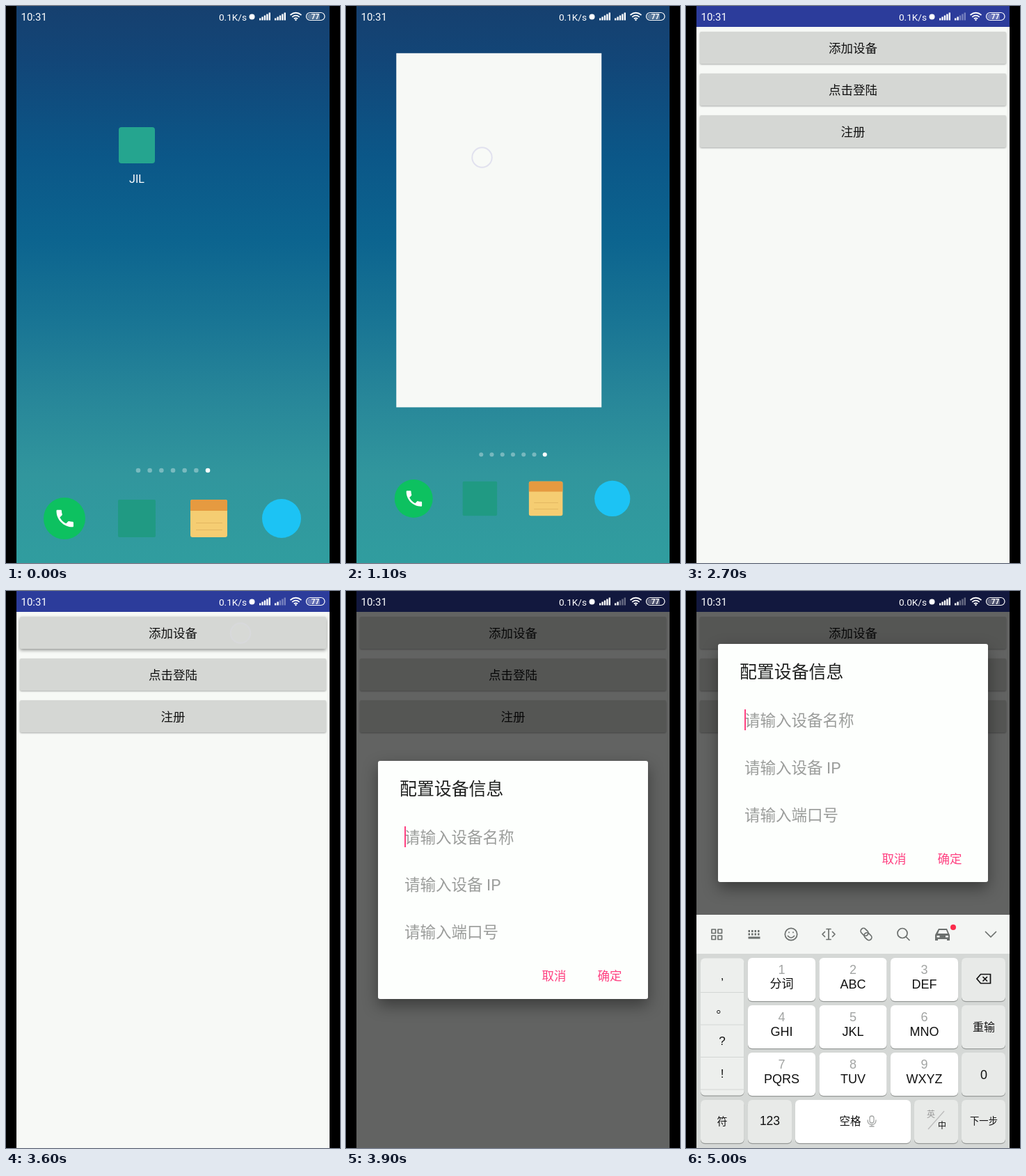
These frames come from a looping animation (480x800 px, 5100 ms). An HTML page:

```html
<!DOCTYPE html>
<html lang="zh-CN">
<head>
<meta charset="utf-8">
<title>Phone walkthrough</title>
<style>
  html, body { margin: 0; width: 100%; height: 100%; overflow: hidden; background: #000; }
  svg { display: block; width: 480px; height: 800px; }
  text { font-family: Roboto, "Noto Sans CJK SC", "Noto Sans CJK", sans-serif; text-anchor: middle; }
  .raised { filter: drop-shadow(0 1px 1px rgba(0,0,0,.32)); }
  .pressed { filter: drop-shadow(0 2.5px 2.5px rgba(0,0,0,.42)); }
  #dialog { filter: drop-shadow(0 9px 11px rgba(0,0,0,.4)); }
  #dialog text { text-anchor: start; }
  #keyboard text { font-family: "Liberation Sans", "Noto Sans CJK SC", "Noto Sans CJK", sans-serif; }
  .line { fill: none; stroke: #6b6f6d; stroke-width: 1.7; stroke-linecap: round; stroke-linejoin: round; }
</style>
</head>
<body>
<svg viewBox="0 0 480 800">
  <defs>
    <linearGradient id="sky" x2="0" y2="1">
      <stop stop-color="#16406f"/>
      <stop offset=".1" stop-color="#124678"/>
      <stop offset=".27" stop-color="#0b5788"/>
      <stop offset=".42" stop-color="#0c648f"/>
      <stop offset=".56" stop-color="#187494"/>
      <stop offset=".7" stop-color="#278699"/>
      <stop offset=".84" stop-color="#31969d"/>
      <stop offset="1" stop-color="#309d9f"/>
    </linearGradient>
    <clipPath id="screen"><rect x="15" width="450" height="800"/></clipPath>
  </defs>
  <rect width="480" height="800"/>
  <g clip-path="url(#screen)">
    <rect x="15" width="450" height="800" fill="url(#sky)"/>

    <g id="home">
      <rect x="162" y="174" width="52" height="52" rx="4" fill="#25a58f"/>
      <text x="188" y="254" font-size="16" fill="#fff">JIL</text>
      <g id="dots" fill="#fff"></g>
      <circle cx="84" cy="736" r="30" fill="#0dc160"/>
      <path transform="translate(68.4 719.7) scale(1.36)" fill="#fff" d="M6.6 10.8c1.4 2.8 3.8 5.1 6.6 6.6l2.2-2.2c.3-.3.7-.4 1-.2 1.1.4 2.3.5 3.6.5.6 0 1 .5 1 1V20c0 .6-.4 1-1 1C10.600 21 3 13.400 3 4c0-.6.5-1 1-1h3.500c.6 0 1 .4 1 1 0 1.300.2 2.500.6 3.600.1.300 0 .7-.3 1z"/>
      <rect x="161" y="709" width="54" height="54" rx="2" fill="#209a83"/>
      <rect x="265" y="709" width="53" height="54" rx="3" fill="#f5cd72"/>
      <path d="M265 725v-13q0-3 3-3h47q3 0 3 3v13z" fill="#e69a40"/>
      <path d="M273 742.500h38M273 752.500h38" stroke="#e3b661"/>
      <circle cx="396" cy="736" r="28" fill="#1cc3f4"/>
    </g>

    <rect id="window" fill="#f7f9f6"/>
    <g id="app">
      <rect x="15" width="450" height="30" fill="#2c3c9b"/>
      <g id="buttons"></g>
    </g>
    <rect id="dim" x="15" width="450" height="800"/>

    <g id="dialog">
      <rect x="46" y="244" width="388" height="342" rx="3" fill="#fdfffd"/>
      <text x="77" y="293" font-size="24.900" fill="#1f201f">配置设备信息</text>
      <g font-size="22.500" fill="#9b9d9b">
        <text x="84" y="362">请输入设备名称</text>
        <text x="84" y="430">请输入设备 IP</text>
        <text x="84" y="498">请输入端口号</text>
      </g>
      <g font-size="17.500" fill="#ff4081">
        <text x="281.500" y="558.500">取消</text>
        <text x="361.500" y="558.500">确定</text>
        <rect id="caret" x="84" y="338" width="2" height="30"/>
      </g>
    </g>

    <g id="keyboard">
      <rect x="15" y="465" width="450" height="56" fill="#f3f5f3"/>
      <rect x="15" y="521" width="450" height="280" fill="#d5d8d6"/>
      <g class="line">
        <path d="M37 486h5.500v5.500H37zM46 486h5.500v5.500H46zM37 495h5.500v5.500H37zM46 495h5.500v5.500H46z"/>
        <path d="M89.500 488.500h17M89.500 493h17" stroke-width="3" stroke-dasharray="2.500 2" stroke-linecap="butt"/>
        <path d="M89.500 498h17" stroke-width="3" stroke-linecap="butt"/>
        <circle cx="151" cy="493" r="8.700"/>
        <path d="M148 490v.5M154 490v.5M146.500 495.500q4.500 5 9 0"/>
        <path d="M202 485.500h6M205 485.500v15M202 500.500h6M199.500 489.500l-3.500 3.500 3.500 3.500M210.500 489.500l3.500 3.500-3.500 3.500"/>
        <g transform="rotate(45 259 493)">
          <rect x="249" y="488.500" width="12" height="8" rx="4"/>
          <rect x="257" y="489.500" width="12" height="8" rx="4"/>
        </g>
        <circle cx="311" cy="491.500" r="7"/>
        <path d="M316 496.500l5 5M430.500 489.500l7.500 7.500 7.500-7.500"/>
      </g>
      <path fill="#6b6f6d" fill-rule="evenodd" d="M363 485h12l3 7 1 2v8h-4v-2h-13v2h-4v-8l1-2zM364 487l-2 5h14l-2-5zM360.500 495v2.500h4V495zM373 495v2.500h4V495z"/>
      <circle cx="384" cy="483" r="4" fill="#fb2b4b"/>
      <g id="keys"></g>
      <path d="M423.500 550.500h14v13h-14l-5.500-6.500zM426.500 554l6.500 6.500m0-6.500l-6.500 6.500" fill="none" stroke="#111" stroke-width="1.700"/>
      <g fill="none" stroke="#a5a7a6" stroke-width="1.300">
        <rect x="264" y="754" width="6" height="10" rx="3"/>
        <path d="M261 759.500q0 7 6 7t6-7M267 766.500v2.500M263.500 769h7"/>
        <path d="M348 773l23-26" stroke="#bbb"/>
      </g>
    </g>

    <g id="status" fill="#fff">
      <text x="21.500" y="21" font-size="15" style="text-anchor:start">10:31</text>
      <text id="speed" x="346" y="20.500" font-size="13.600" style="text-anchor:end"></text>
      <circle cx="353.500" cy="15.500" r="4"/>
      <g id="signals"></g>
      <g fill="none" stroke="#fff" stroke-width="1.700">
        <path d="M408.500 13q8-6.500 16 0M411.200 15.800q5.300-4.200 10.600 0M413.800 18.300q2.700-2 5.400 0"/>
        <rect x="431.500" y="9.500" width="26.500" height="11" rx="5.500" stroke-width="1.200"/>
      </g>
      <path d="M437 11h14v8h-14q-4 0-4-4t4-4z" opacity=".3"/>
      <circle cx="416.500" cy="20" r="1.200"/>
      <text x="444.500" y="18.800" font-size="10" font-weight="700">77</text>
    </g>
    <circle id="touch" r="14.200" fill="#fff" fill-opacity=".15" stroke="#dfdfee" stroke-width="2"/>
  </g>
</svg>
<script>
const $ = id => document.getElementById(id);
const set = (id, attrs) => { for (const k in attrs) $(id).setAttribute(k, attrs[k]); };
const show = (id, on) => { $(id).style.visibility = on ? 'visible' : 'hidden'; };
const label = (x, y, size, str, fill = '#111') =>
  `<text x="${x}" y="${y + size * .37}" font-size="${size}" fill="${fill}">${str}</text>`;
const times = (n, fn) => Array.from({ length: n }, (_, i) => fn(i)).join('');

$('dots').innerHTML = times(7, i =>
  `<circle cx="${190 + i * 16.67}" cy="667" r="3.300" opacity="${i < 6 ? .35 : 1}"/>`);

$('buttons').innerHTML = ['添加设备', '点击登陆', '注册'].map((s, i) =>
  `<g class="raised"><rect x="20" y="${37 + i * 60}" width="440" height="46" rx="2" fill="#d5d7d4"/></g>`
  + label(240, 60.5 + i * 60, 17.5, s)).join('');

$('signals').innerHTML = times(10, i => {
  const bar = i % 5, h = 3 + bar * 2;
  return `<rect x="${364 + (i > 4 ? 22 : 0) + bar * 3.4}" y="${20.5 - h}" width="2.400" height="${h}"/>`;
});
const weakBars = [...$('signals').children].slice(7);

const key = (x, y, w, fill = '#e8eae8', h = 62) =>
  `<rect x="${x}" y="${y + 1.2}" width="${w}" height="${h}" rx="6" fill="#989b99"/>
   <rect x="${x}" y="${y}" width="${w}" height="${h}" rx="6" fill="${fill}"/>`;
const letters = ['分词', 'ABC', 'DEF', 'GHI', 'JKL', 'MNO', 'PQRS', 'TUV', 'WXYZ'];
$('keys').innerHTML =
  key(21, 527.5, 62.5, '#edefed', 197)
  + times(4, i => `<path d="M21 ${576.5 + i * 46.5}h62.500" stroke="#d3d6d4"/>`)
  + [[',', 552], ['。', 600], ['?', 646], ['!', 693]].map(([s, y]) => label(52, y, 17, s)).join('')
  + letters.map((s, i) => {
      const x = 89 + i % 3 * 102.5, y = 527 + Math.floor(i / 3) * 68;
      return key(x, y, 97, '#fff') + label(x + 48.5, y + 16, 18, i + 1, '#a2a4a3')
        + label(x + 48.5, y + 37, i ? 18 : 17, s);
    }).join('')
  + times(3, i => key(396, 527 + i * 68, 63))
  + label(428, 626, 16, '重输') + label(428, 694, 18, '0')
  + key(21, 731, 62.5) + label(52, 761, 15, '符')
  + key(89, 731, 63) + label(120.5, 761, 17.5, '123')
  + key(157, 731, 166, '#fff') + label(236, 761, 15.5, '空格')
  + key(328, 731, 63) + label(352, 752, 12, '英', '#999') + label(368, 768, 12, '中')
  + key(396, 731, 63) + label(428, 761, 13.3, '下一步');

// x, y, start, end, opacity
const touches = [[195.5, 217.5, 700, 1200, .9], [337, 60.5, 3400, 3700, .3], [249, 356.5, 4500, 4700, .9]];
const ramp = (t, start, length) => Math.min(1, Math.max(0, (t - start) / length));
const easeOut = (u, power) => 1 - (1 - u) ** power;
const mix = (a, b, u) => a + (b - a) * u;

function draw(t) {
  const open = easeOut(ramp(t, 900, 400), 1.36);
  const left = mix(162, 15, open), top = mix(174, 0, open);
  set('window', {
    x: left, y: top, width: mix(214, 465, open) - left, height: mix(226, 800, open) - top,
    opacity: Math.min(1, open * 4)
  });
  set('home', { transform: `translate(240 400) scale(${1 - .139 * open}) translate(-240 -400)` });
  show('app', t >= 1300);
  show('buttons', t >= 1400);
  $('buttons').firstChild.setAttribute('class', t >= 3400 && t < 3800 ? 'pressed' : 'raised');

  const pop = easeOut(ramp(t, 3600, 300), 2);
  const lift = 168 * easeOut(ramp(t, 4700, 300), 2);
  set('dim', { opacity: .6 * pop });
  set('dialog', {
    opacity: pop,
    transform: `translate(240 ${415 - lift}) scale(${mix(.9, 1, pop)}) translate(-240 -415)`
  });
  show('caret', t < 4200 || t >= 4500);

  const rise = easeOut(ramp(t, 4600, 300), 2);
  set('keyboard', { transform: `translate(0 ${335 * (1 - rise)})` });

  $('speed').textContent = t < 4200 ? '0.1K/s' : '0.0K/s';
  for (const bar of weakBars) bar.setAttribute('opacity', t < 1800 ? 1 : .35);

  const touch = touches.find(([, , start, end]) => t >= start && t < end);
  show('touch', touch);
  if (touch) set('touch', { cx: touch[0], cy: touch[1], opacity: touch[4] });
}

const begin = performance.now();
function tick() {
  draw(Math.floor((performance.now() - begin) % 5100 / 100) * 100);
  requestAnimationFrame(tick);
}
tick();
</script>
</body>
</html>
```
